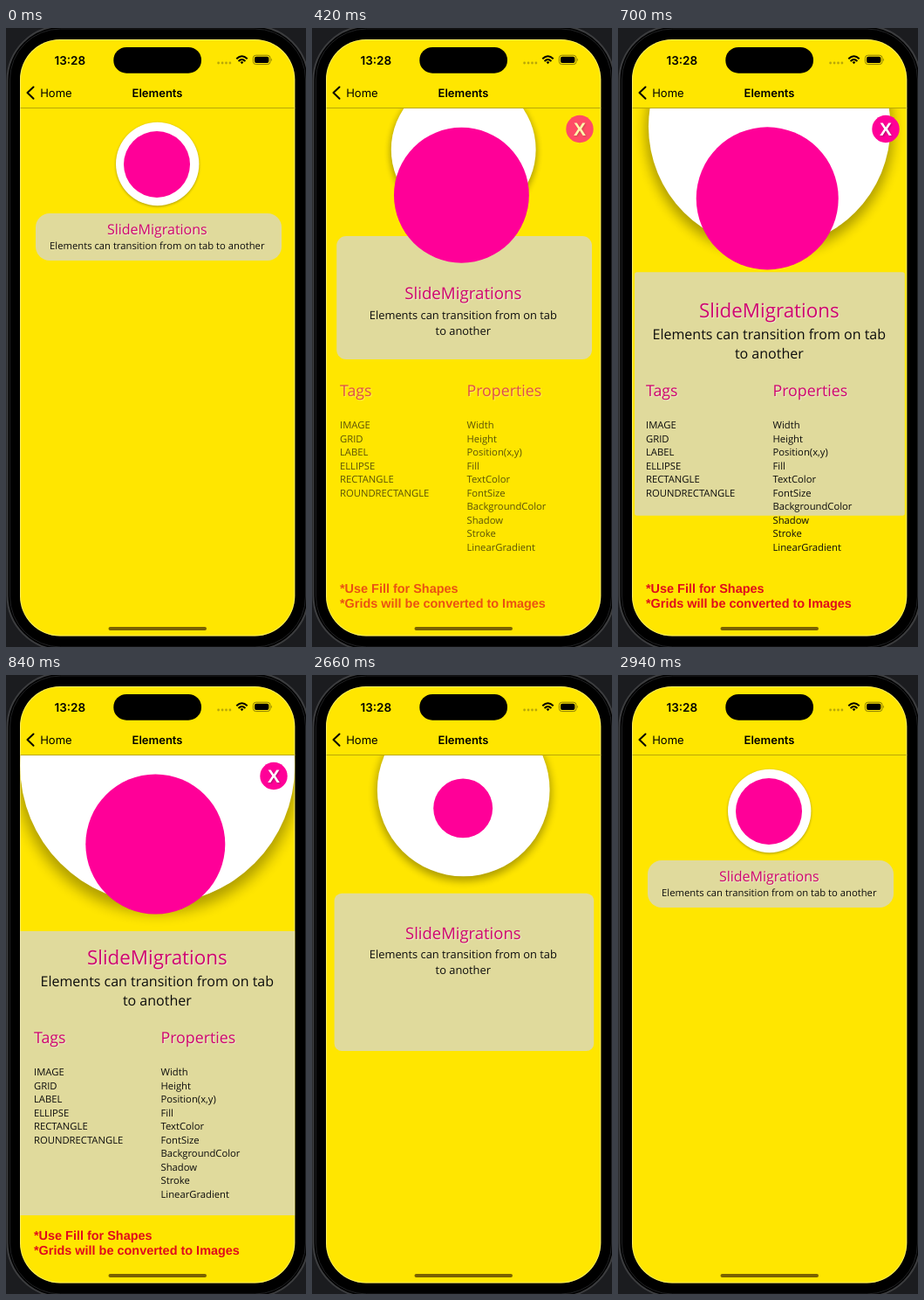
Recreate the animation shown at these times as an HTML page. Size 344x708 px, loop 3010 ms.

```html
<!DOCTYPE html>
<html lang="en">
<head>
<meta charset="utf-8">
<style>
  html, body { margin: 0; width: 100%; height: 100%; overflow: hidden; background: #1b1c1f; }
  svg { display: block; width: 344px; height: 708px; }
  text { white-space: pre; text-rendering: geometricPrecision; }
  .ui { font-family: Inter, sans-serif; font-size: 13px; }
  .bold { font-weight: 600; }
  .clock { font-size: 13.5px; }
  .body { font-family: "Open Sans", sans-serif; fill: #0c0c0c; }
  .pink { fill: #cf0670; text-shadow: 1px 1px 1px rgba(255, 255, 255, .5); }
  .head { font-size: 17.8px; }
  .item { font-size: 11.25px; }
  .note { font: bold 14.45px "Liberation Sans", Arial, sans-serif; fill: #e00a1c; }
  .cross { font: bold 21px "Liberation Sans", Arial, sans-serif; fill: #fff; text-shadow: 1px 1px 2px rgba(0, 0, 0, .3); }
  .mid { text-anchor: middle; }
</style>
</head>
<body>
<svg viewBox="0 0 344 708">
  <defs>
    <clipPath id="screen"><rect x="16" y="13" width="315.3" height="682.5" rx="46"/></clipPath>
    <clipPath id="page"><rect x="16" y="92" width="315.5" height="603.5"/></clipPath>
  </defs>

  <rect x="1.5" y="-2" width="345" height="713" rx="62" fill="#000" stroke="#3c3d3f" stroke-width="2"/>
  <rect x="4.5" y="1" width="339" height="707" rx="58" fill="#000" stroke="#202123"/>

  <g clip-path="url(#screen)">
    <rect x="16" y="13" width="316" height="683" fill="#ffe600"/>
    <g clip-path="url(#page)">
      <circle id="shade" fill="#000" opacity=".32"/>
      <circle id="disc" fill="#fff"/>
      <rect id="panel" fill="#e0da9c"/>
      <circle id="badge" fill="#ff0098"/>
      <text id="title" class="body pink mid" x="173.3">SlideMigrations</text>
      <text id="line1" class="body mid" x="173.3"></text>
      <text id="line2" class="body mid" x="173.3"></text>
      <g id="details">
        <circle cx="307" cy="115.5" r="15.7" fill="#ff0098"/>
        <text class="cross mid" x="307" y="123">X</text>
        <text class="note" x="32" y="646">*Use Fill for Shapes</text>
        <text class="note" x="32" y="662.5">*Grids will be converted to Images</text>
      </g>
    </g>
    <path d="M16 91.5H332" stroke="#b9a808"/>
    <rect x="16" y="13" width="315.3" height="682.5" rx="46" fill="none" stroke="#fffbd0" stroke-opacity=".45" stroke-width="2"/>
  </g>

  <rect x="123.3" y="22" width="100.7" height="29.7" rx="14.8"/>
  <text class="ui bold clock mid" x="73.3" y="41.6">13:28</text>
  <g fill="#b9a708">
    <circle cx="243.6" cy="40" r="1.4"/><circle cx="248.1" cy="40" r="1.4"/>
    <circle cx="252.5" cy="40" r="1.4"/><circle cx="256.9" cy="40" r="1.4"/>
  </g>
  <g fill="none" stroke="#000" stroke-width="2">
    <path d="M264.3 35.2Q270.5 29.4 276.7 35.2M266.6 37.9Q270.5 34.2 274.4 37.9"/>
    <path d="M268.6 39L270.5 41.2L272.4 39Q270.5 37.4 268.6 39Z" fill="#000" stroke="none"/>
    <path d="M31.5 67.5L24.5 74L31.5 80.7" stroke-linecap="round" stroke-linejoin="round"/>
  </g>
  <rect x="283.4" y="31.2" width="19.6" height="10.4" rx="3.2" fill="none" stroke="#8a7c05"/>
  <rect x="285" y="32.8" width="16.4" height="7.2" rx="1.9"/>
  <path d="M304.2 34.6q1.8 1.8 0 3.6z" fill="#8a7c05"/>
  <text class="ui" x="39.2" y="78.6">Home</text>
  <text class="ui bold mid" x="173.5" y="78.6">Elements</text>
  <rect x="117.5" y="685" width="112.5" height="4" rx="2" fill="#7a6200"/>
</svg>

<script>
const LOOP = 3010, STEP = 70, OPEN = 350, CLOSE = 2450;
const $ = id => document.getElementById(id);
const set = (id, attrs) => {
  for (const k in attrs) $(id).setAttribute(k, attrs[k]);
};
const mix = (a, b, t) => a + (b - a) * t;
const clamp = v => Math.min(1, Math.max(0, v));
const backOut = x => {
  const u = x - 1;
  return u * u * (2.70158 * u + 1.70158) + 1;
};

function addList(x, heading, items) {
  const add = (cls, y, str) => {
    const t = document.createElementNS("http://www.w3.org/2000/svg", "text");
    t.setAttribute("class", "body " + cls);
    t.setAttribute("x", x);
    t.setAttribute("y", y);
    t.textContent = str;
    $("details").append(t);
  };
  add("pink head", 420.7, heading);
  items.forEach((s, i) => add("item", 458 + i * 15.5, s));
}
addList(32, "Tags", ["IMAGE", "GRID", "LABEL", "ELLIPSE", "RECTANGLE", "ROUNDRECTANGLE"]);
addList(177.5, "Properties", ["Width", "Height", "Position(x,y)", "Fill", "TextColor",
  "FontSize", "BackgroundColor", "Shadow", "Stroke", "LinearGradient"]);

// Progress of every part, 0 = card, 1 = detail page
function pose(t) {
  if (t < OPEN) return { box: 0, logo: 0, head: 0, sub: 0, drop: 0, fade: 0 };
  if (t < CLOSE) {
    const n = Math.floor((t - OPEN) / STEP) + 1;
    const p = clamp(.067 + .127 * n);
    return {
      box: p, logo: backOut(p), drop: 1 - (1 - p) ** 4, fade: clamp(2.1 * p),
      head: clamp(.085 + .17 * n), sub: clamp(.005 + .168 * n)
    };
  }
  const n = Math.floor((t - CLOSE) / STEP) + 1;
  const q = clamp(.006 + .132 * n);
  return {
    box: 1 - q, logo: 1 - backOut(q), drop: 1 - q ** 1.9, fade: clamp(1 - 2.05 * q),
    head: clamp(1.065 - .17 * n), sub: clamp(1.02 - .17 * n)
  };
}

function draw(t) {
  const { box, logo, head, sub, drop, fade } = pose(t);
  const cx = 173.7, cy = mix(155.5, 104, box), r = mix(47.7, 157.5, box);
  set("disc", { cx, cy, r });
  set("shade", { cx, cy: cy + mix(1, 6.5, box), r: r + 4 * box });
  $("shade").style.filter = `blur(${mix(1.8, 8, box)}px)`;

  const x = mix(34, 16, box), y = mix(212, 293, box);
  set("panel", {
    x, y, rx: mix(16, 0, box),
    width: mix(316, 331.5, box) - x,
    height: mix(266, 618, box) - y
  });
  set("badge", { cx: mix(173, 171.3, logo), cy: mix(156, 193.5, logo), r: mix(38, 80, logo) });

  const big = mix(16, 22.4, head), small = mix(11.25, 16, sub);
  set("title", { y: mix(230, 323.5, drop) + .357 * big, "font-size": big });
  const base = mix(249, 350, drop) + .357 * small, wrap = small > 12.5;
  set("line1", { y: base, "font-size": small });
  set("line2", { y: base + 1.37 * small, "font-size": small });
  const first = "Elements can transition from on tab", rest = "to another";
  $("line1").textContent = wrap ? first : first + " " + rest;
  $("line2").textContent = wrap ? rest : "";

  set("details", { opacity: fade });
}

const start = performance.now();
function tick() {
  draw((performance.now() - start) % LOOP);
  requestAnimationFrame(tick);
}
tick();
</script>
</body>
</html>
```
